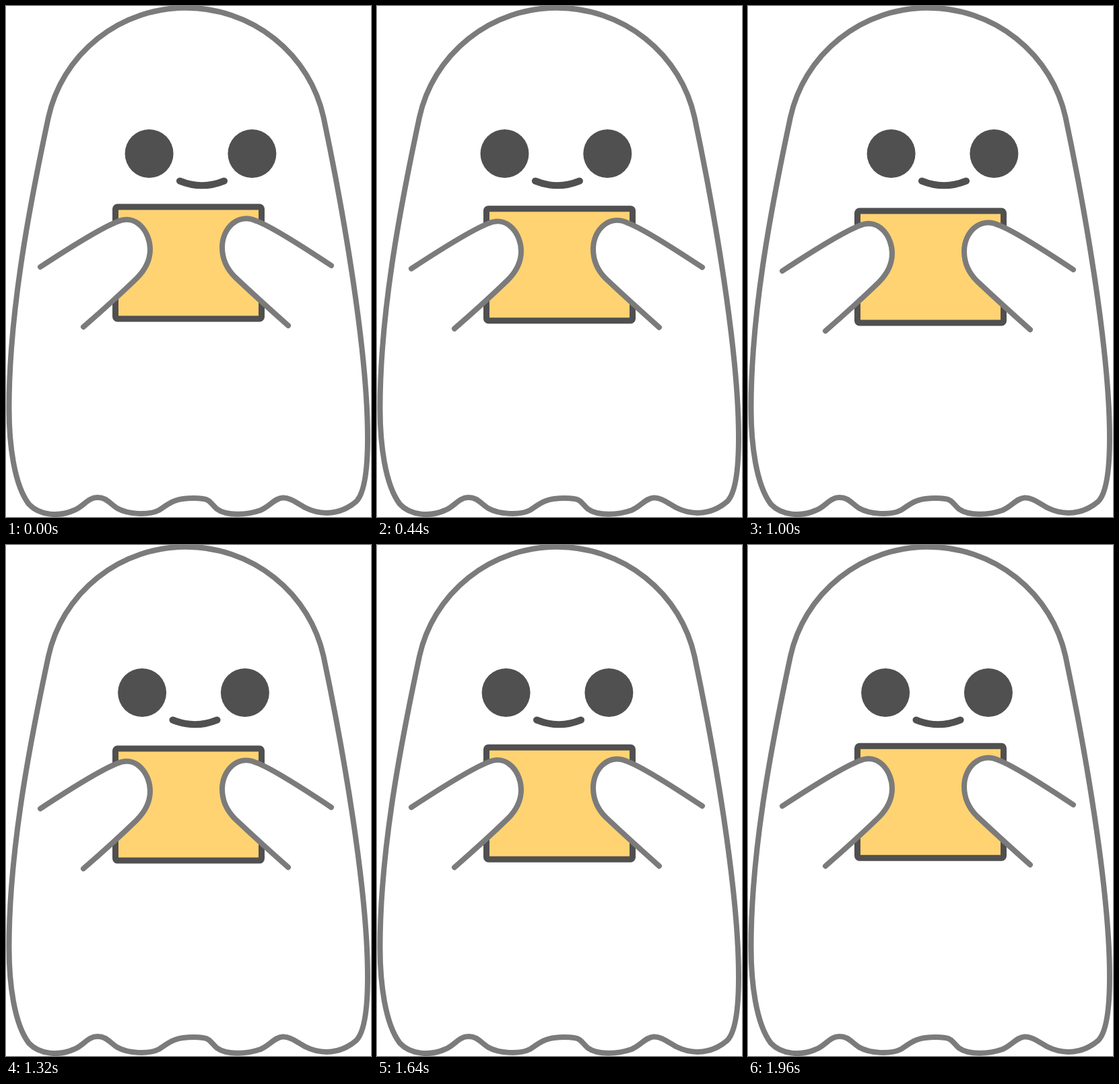
Recreate the animation shown at these times as an HTML page. Size 542 by 758 pixels, loop 2000 ms.

```html
<!DOCTYPE html>
<html lang="en">
<head>
<meta charset="utf-8">
<title>Reading ghost</title>
<style>
  html, body { margin: 0; width: 100%; height: 100%; overflow: hidden; background: #fff; }
  svg { display: block; width: 100%; height: 100%; stroke-linecap: round; stroke-linejoin: round; }
  .skin { fill: #fff; stroke: #7b7b7b; stroke-width: 8; }
  .dark { stroke: #505050; }
</style>
</head>
<body>
<svg viewBox="0 0 542 758">
  <path class="skin" d="M63 165 A209 206 0 0 1 471.5 165
    C500 300 537 510 537 640 C537 685 533 722 520 735
    C498 754 470 757 444 744 C430 736 421 729 411 729.5 C399 730 392 742 378 748
    C358 755 328 757 313 746 C305 739 303 732 293 731 Q279 729 263 731
    C245 733 236 743 227 748 C211 756 181 754 165 745 C153 737 149 729 136 729
    C121 729 115 743 101 748 C79 758 50 756 34 739
    C12 710 4.5 650 4.5 597 C4.5 460 32 310 63 165Z"/>
  <g id="face">
    <g fill="#505050">
      <circle cx="212.6" cy="219" r="36"/>
      <circle cx="365.4" cy="219" r="36"/>
    </g>
    <path class="dark" fill="none" stroke-width="10" d="M258 259.5 Q291 273 324 259.5"/>
  </g>
  <g id="book">
    <rect class="dark" x="162.5" y="298" width="217" height="166" rx="3" fill="#ffd372" stroke-width="9"/>
    <path class="skin" d="M51 387 Q135 332 165 320 C194 307 214 336 214 361 C214 380 204 394 194 404 Q160 437 115 476"/>
    <path class="skin" d="M483 385 Q397 328 372 319 C344 306 321 330 321 358 C321 378 329 391 340 402 Q375 435 419 474"/>
  </g>
</svg>
<script>
  const LOOP = 2000, STEP = 40;
  const face = document.getElementById('face');
  const book = document.getElementById('book');

  // Each line is scanned slowly to the left, followed by a quick return.
  const gaze = [[0, 0], [800, -42], [1000, 0], [1866, -28.4], [2000, 0]];

  function along(keys, t) {
    const i = keys.findIndex(([time]) => time > t);
    const [t0, a] = keys[i - 1], [t1, b] = keys[i];
    return a + (b - a) * (t - t0) / (t1 - t0);
  }

  function draw(now) {
    const t = Math.floor(now % LOOP / STEP) * STEP;
    const drop = 6 * (1 - Math.abs(t - 1000) / 1000);
    face.setAttribute('transform', `translate(${along(gaze, t)} 0)`);
    book.setAttribute('transform', `translate(0 ${drop})`);
  }

  const start = performance.now();
  function tick() {
    draw(performance.now() - start);
    requestAnimationFrame(tick);
  }
  tick();
</script>
</body>
</html>
```
